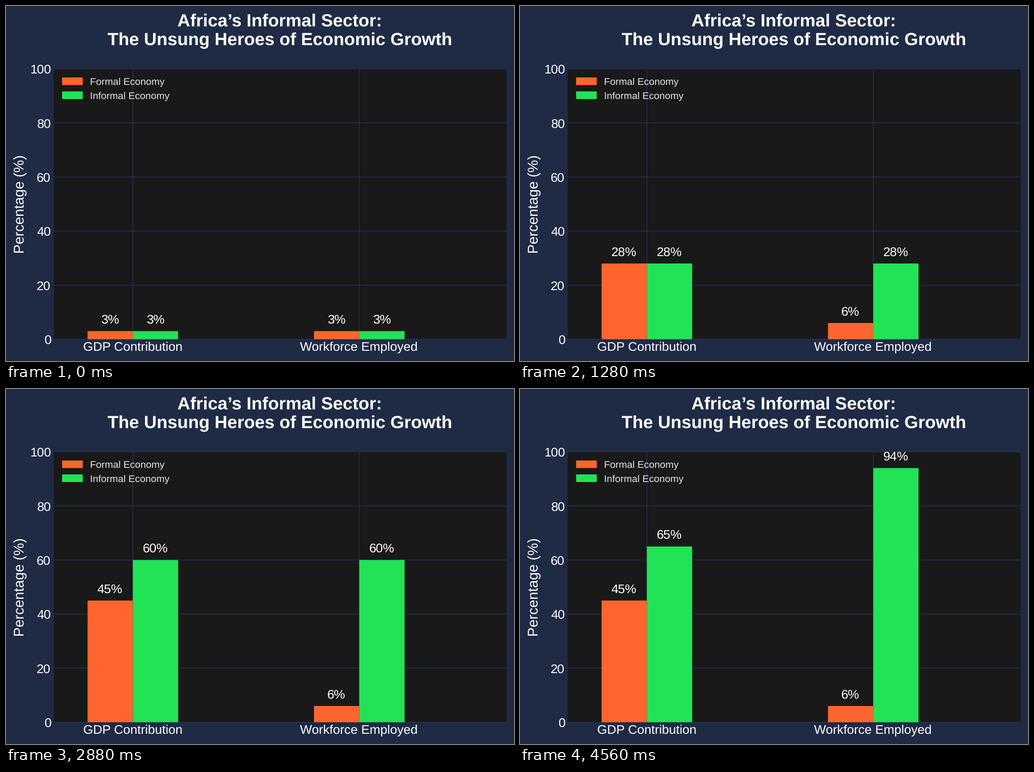
A matplotlib script for the animation above (4.72 s loop, 895 by 626 pixels).

```python
import matplotlib.pyplot as plt
from matplotlib.animation import FuncAnimation
from matplotlib.patches import Rectangle

WIDTH, HEIGHT, DPI = 895, 626, 64
FRAMES, INTERVAL = 59, 80

NAVY, PANEL, GRID = "#1f2a45", "#191919", "#2a3459"
ORANGE, GREEN = "#ff652d", "#22e356"

LEFT, RIGHT, TOP, BASE = 84, 882, 110.8, 587.6
PER_CENT = (BASE - TOP) / 100
BAR_WIDTH = 79.8
CATEGORIES = {"GDP Contribution": 223.5, "Workforce Employed": 622.4}

plt.rcParams["font.family"] = "Liberation Sans"
plt.rcParams["text.hinting"] = "none"

fig = plt.figure(figsize=(WIDTH / DPI, HEIGHT / DPI), dpi=DPI, facecolor=NAVY)
ax = fig.add_axes([0, 0, 1, 1])
ax.set_xlim(0, WIDTH)
ax.set_ylim(HEIGHT, 0)
ax.axis("off")


def level(percent):
    return BASE - percent * PER_CENT


def write(x, baseline, text, px=22.4, color="white", ha="center", **style):
    return ax.text(x, baseline, text, fontsize=px * 72 / DPI, color=color,
                   ha=ha, va="baseline", zorder=4, **style)


def box(x, y, width, height, color, zorder=3):
    return ax.add_patch(Rectangle((x, y), width, height, facecolor=color,
                                  linewidth=0, zorder=zorder, snap=False))


def grid_line(xs, ys):
    ax.plot(xs, ys, color=GRID, linewidth=1.1 * 72 / DPI, zorder=2,
            solid_capstyle="butt", snap=False)


# Panel, grid and axis labels
box(LEFT, TOP, RIGHT - LEFT, BASE - TOP, PANEL, zorder=1)
for tick in range(0, 101, 20):
    grid_line([LEFT, RIGHT], [level(tick)] * 2)
    write(79.2, level(tick) + 8.2, str(tick), ha="right")
for name, x in CATEGORIES.items():
    grid_line([x, x], [TOP, BASE])
    write(x - 0.4, 608.3, name)
write(31.6, 349.3, "Percentage (%)", px=25, rotation=90,
      rotation_mode="anchor")

# Title
write(482.3, 36, "Africa’s Informal Sector:", px=31.1, weight="bold")
write(482.3, 69.8, "The Unsung Heroes of Economic Growth", px=31.1,
      weight="bold")

# Legend
for y, name, color in [(126, "Formal Economy", ORANGE),
                       (150.6, "Informal Economy", GREEN)]:
    box(98.8, y, 36.4, 13.4, color)
    write(147.9, y + 12.8, name, px=17.4, color="0.9", ha="left")


class Bar:
    def __init__(self, x, color, limit):
        self.limit = limit
        self.rect = box(x, BASE, BAR_WIDTH, 0, color)
        self.label = write(x + BAR_WIDTH / 2 - 0.3, BASE, "")

    def show(self, percent):
        value = min(percent, self.limit)
        top = level(value)
        self.rect.set_y(top)
        self.rect.set_height(BASE - top)
        self.label.set_y(top - 13.4)
        self.label.set_text(f"{value}%")


bars = []
for x, (formal, informal) in zip(CATEGORIES.values(), [(45, 65), (6, 94)]):
    bars += [Bar(x - BAR_WIDTH, ORANGE, formal), Bar(x, GREEN, informal)]


def update(frame):
    # All bars climb together at 1.6 points per step until each hits its limit
    percent = 3 + frame * 8 // 5
    for bar in bars:
        bar.show(percent)
    return []


anim = FuncAnimation(fig, update, frames=FRAMES, interval=INTERVAL,
                     repeat=True, repeat_delay=0)
plt.show()
```
